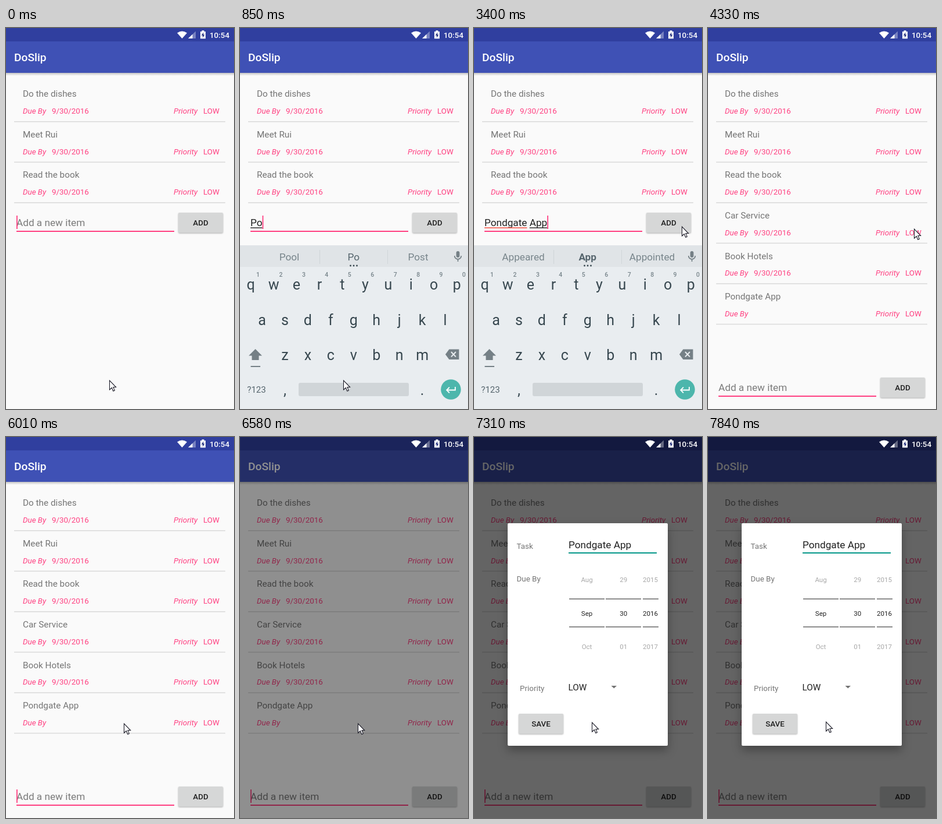
Write an HTML page that moves like this. It is 393x654 px and loops after 8000 ms.

```html
<!DOCTYPE html>
<html lang="en">
<head>
<meta charset="utf-8">
<title>To-do list</title>
<style>
html, body { margin: 0; width: 100%; height: 100%; overflow: hidden; background: #fafafa; }
svg { display: block; width: 100%; height: 100%; font-family: Roboto, sans-serif; }
.mid { text-anchor: middle; }
.it { font-style: italic; }
.med { font-weight: 500; }
.b { font-weight: 700; }
.raised { filter: drop-shadow(0 1px 1px rgba(0,0,0,.3)); }
.pressed { filter: drop-shadow(0 3px 2px rgba(0,0,0,.4)); }
.dialog { filter: drop-shadow(0 8px 8px rgba(0,0,0,.3)); }
</style>
</head>
<body>
<svg id="stage" viewBox="0 0 393 654"></svg>
<script>
const LOOP = 8000, PINK = '#ff4081', GREY = '#757575', DARK = '#212121', KEY = '#37474f', ICON = '#758086';
const BIG = 17.2, MID = 15.3, SMALL = 13.4;
const stage = document.getElementById('stage');
const pen = document.createElement('canvas').getContext('2d');

const textWidth = s => {
  pen.font = BIG + 'px Roboto, sans-serif';
  return pen.measureText(s).width;
};
const text = (x, y, s, size, fill, cls = '') =>
  `<text x="${x}" y="${y}" font-size="${size}" fill="${fill}" class="${cls}">${s}</text>`;
const rect = (x, y, w, h, fill, more = '') =>
  `<rect x="${x}" y="${y}" width="${w}" height="${h}" fill="${fill}" ${more}/>`;
const path = (d, fill, more = '') => `<path d="${d}" fill="${fill}" ${more}/>`;
const group = (x, y, body, more = '') => `<g transform="translate(${x} ${y})" ${more}>${body}</g>`;

// Each table holds [start time, value...]; the last started entry counts.
const at = (table, t) => table.reduce((now, step) => step[0] <= t ? step : now).slice(1);

const tasks = ['Do the dishes', 'Meet Rui', 'Read the book', 'Car Service', 'Book Hotels', 'Pondgate App'];
const typed = [
  [0, ''], [550, 'P'], [850, 'Po'], [970, 'Pon'], [1090, 'Pond'], [1210, 'Pondg'], [1330, 'Pondga'],
  [1480, 'Pondgat'], [1610, 'Pondgate'], [1750, 'Pondgate '], [2050, 'Pondgate A'],
  [2340, 'Pondgate Ap'], [2890, 'Pondgate App'], [3820, '']
];
const hints = [
  [0, '', '', ''], [700, 'On', 'P', 'Put'], [850, 'Pool', 'Po', 'Post'], [970, 'Pony', 'Pon', 'Pond'],
  [1090, 'Ponds', 'Pond', 'Ponder'], [1210, 'Pond', 'Pondg', 'Ponds'], [1330, 'Pond a', 'Pondga', 'Pond go'],
  [1480, 'Pond ga', 'Pondga', 'Pond gas'], [1610, 'Pond gat', 'Pondgat', 'Pond gait'],
  [2050, 'And', 'A', 'As'], [2890, 'Appeared', 'App', 'Appointed']
];
const mouse = [
  [0, 178, 604], [2730, 286, 386], [2890, 328, 339], [3160, 375, 337], [3280, 366, 338], [3400, 358, 340],
  [4330, 355, 344], [4460, 344, 355], [4600, 262, 436], [4720, 203, 500], [5740, 203, 491],
  [7010, 203, 490], [7160, 203, 489], [7840, 203, 488]
];
const caretOn = [[0, 1], [3160, 0], [3400, 1], [4330, 0], [4720, 1], [5150, 0], [5740, 1]];
const keyboardDrop = [[0, 281], [310, 150], [430, 28], [550, 0], [3820, 70], [3940, 190], [4060, 281]];
const click = [[0, 0], [3550, 1], [3670, 0], [5890, 1], [6010, 0]];
const dim = [[0, 0], [6580, .43], [6710, .6]];
const changes = [...new Set([typed, hints, mouse, caretOn, keyboardDrop, click, dim, [[7310]]]
  .flat().map(step => step[0]))].sort((a, b) => a - b).map(t => [t, t]);

function button(x, y, label, cls = 'raised') {
  return rect(x, y, 77, 34.5, '#d6d7d7', `rx="2" class="${cls}"`) +
    text(x + 38.5, y + 22, label, SMALL, DARK, 'mid med');
}

function taskRow(name, i) {
  return group(0, i * 69.55,
    text(29, 118.4, name, MID, GREY) +
    text(29, 147, 'Due By', SMALL, PINK, 'it') +
    (i < 5 ? text(79, 147, '9/30/2016', SMALL, PINK) : '') +
    text(289, 147, 'Priority', SMALL, PINK, 'it') +
    text(340, 147, 'LOW', SMALL, PINK) +
    rect(14, 160, 364, 1.5, '#dadada'));
}

function inputRow(t, y) {
  const s = at(typed, t)[0], [first, second] = s.split(' ');
  const split = 18 + textWidth(first + ' ');
  const line = (x, word, fill) => rect(x, 342.3, textWidth(word), 1.4, fill);
  let body = s ? text(18, 340, s, BIG, DARK) : text(18, 340, 'Add a new item', BIG, '#7b7b7b');
  if (s && t >= 700 && t < 1910) body += line(18, first, DARK);
  if (second) body += line(18, first, '#f44336') + line(split, second, DARK);
  if (at(caretOn, t)[0]) body += rect(18 + textWidth(s), 322, 1.8, 23, PINK);
  body += rect(18, 348, 272, 2, PINK);
  body += button(297, 317, 'ADD', t >= 3550 && t < 3820 ? 'pressed' : 'raised');
  return group(0, y, body);
}

function keyboard(t) {
  const letters = (row, x, y) => [...row].map((c, i) => text(x + i * 39.45, y, c, 25, KEY, 'mid')).join('');
  const [left, centre, right] = at(hints, t);
  const stroke = (color, w) => `stroke="${color}" stroke-width="${w}"`;
  return rect(0, 373, 393, 281, '#e9edf0') + rect(0, 373, 393, 37, '#e0e4e7') +
    text(85, 399, left, BIG, '#78858b', 'mid') +
    text(195.7, 399, centre, BIG, '#56656d', t >= 2890 ? 'mid b' : 'mid') +
    text(307, 399, right, BIG, '#78858b', 'mid') +
    [137, 254].map(x => rect(x, 381, 1, 24, '#cfd5d8')).join('') +
    [190.5, 196, 201.5].map(x => `<circle cx="${x}" cy="408" r="1.4" fill="${KEY}"/>`).join('') +
    rect(372.7, 383, 5.8, 11, ICON, 'rx="2.9"') +
    path('M369.8 391a5.8 5.8 0 0 0 11.6 0M375.6 397v4', 'none', stroke(ICON, 1.7)) +
    letters('qwertyuiop', 18.6, 449) + letters('asdfghjkl', 38, 509.5) + letters('zxcvbnm', 77.5, 569.7) +
    [...'1234567890'].map((c, i) => text(31 + i * 39.45, 427.3, c, 10.5, '#78858b', 'mid med')).join('') +
    path('M26.5 551L38 562.5H32.5V570H20.5V562.5H15Z', ICON) + rect(18.5, 580, 16.5, 2, ICON) +
    path('M354 560.2L360.5 551.5H377.5V569H360.5Z', ICON) +
    path('M364 556l8 8.4m0 -8.4l-8 8.4', 'none', stroke('#e9edf0', 2)) +
    text(28.5, 626, '?123', 15, '#56656d', 'mid') +
    text(77.5, 629.5, ',', 25, KEY, 'mid') + text(314, 629.5, '.', 25, KEY, 'mid') +
    rect(101, 609, 190, 23, '#d0d5d8', 'rx="3"') +
    '<circle cx="363.5" cy="620.5" r="17.3" fill="#4db6ac"/>' +
    path('M371 616v5.5H356.5m4.5 -4.8l-4.8 4.8l4.8 4.8', 'none', stroke('#fff', 1.8));
}

function statusIcons() {
  return path('M303.5 18L295 8.4Q303.5 2.4 312 8.4Z', '#fff') +
    path('M327 5.5V18H314Z', '#fff', 'opacity=".35"') + path('M321.5 10.8V18H314Z', '#fff') +
    path('M335 6h2.5V4.2h4V6H344V18.3H335Z', '#fff') + path('M340.3 7.5L336.8 12.8H339V16.8L342.4 11.4H340.3Z', '#26327f') +
    text(351, 17, '10:54', SMALL, '#fff', 'med');
}

function dialog() {
  const columns = [[194.5, 164, 61, 'Aug', 'Sep', 'Oct'], [257.7, 227, 61, '29', '30', '01'],
    [304, 291, 27, '2015', '2016', '2017']];
  return rect(58, 148, 276, 382, '#fff', 'rx="2" class="dialog"') +
    text(73.5, 192, 'Task', SMALL, GREY) +
    text(163, 191, 'Pondgate App', BIG, DARK) + rect(163, 198, 152, 2, '#009688') +
    text(73.5, 248, 'Due By', SMALL, GREY) +
    columns.map(([cx, x, w, ...values]) =>
      values.map((s, i) => text(cx, 249 + i * 57.5, s, 11.5, i == 1 ? DARK : '#a8a8a8', 'mid')).join('') +
      rect(x, 277, w, 1.9, '#878787') + rect(x, 325, w, 1.9, '#878787')).join('') +
    text(79, 436, 'Priority', SMALL, GREY) +
    text(162.5, 434.5, 'LOW', MID, DARK) + path('M236.5 427h9.5l-4.75 4.6Z', '#737373') +
    button(77, 475, 'SAVE');
}

function pointer(t) {
  const [x, y] = at(mouse, t);
  const ring = at(click, t)[0] ? '<circle cx="1.5" cy="1.5" r="10" fill="none" stroke="#333"/>' : '';
  return group(x, y, ring +
    path('M.5 1V17L4.3 13.5L6.8 19.2L9.3 18.1L6.9 12.5H11.6Z', '#fff', 'stroke="#1c1c28" stroke-width="1.1"'));
}

function scene(t) {
  const added = t >= 3820, drop = at(keyboardDrop, t)[0], shade = at(dim, t)[0];
  return '<defs><linearGradient id="edge" x2="0" y2="1"><stop stop-opacity=".22"/><stop offset="1" stop-opacity="0"/></linearGradient></defs>' +
    rect(0, 0, 393, 654, '#fafafa') +
    rect(0, 77, 393, 5, 'url(#edge)') +
    rect(0, 0, 393, 77, '#3f51b5') + rect(0, 0, 393, 23, '#303f9f') +
    text(14, 57, 'DoSlip', 19.2, '#fff', 'med') +
    tasks.slice(0, added ? 6 : 3).map(taskRow).join('') +
    inputRow(t, added ? 283 : 0) +
    (drop < 281 ? group(0, drop, keyboard(t), `opacity="${1 - drop / 281}"`) : '') +
    (shade ? rect(0, 0, 393, 654, '#000', `opacity="${shade}"`) : '') +
    statusIcons() + (t >= 7310 ? dialog() : '') + pointer(t);
}

let shown = -1;
const start = performance.now();
function frame() {
  const [step] = at(changes, (performance.now() - start) % LOOP);
  if (step !== shown) stage.innerHTML = scene(shown = step);
  requestAnimationFrame(frame);
}
frame();
</script>
</body>
</html>
```
